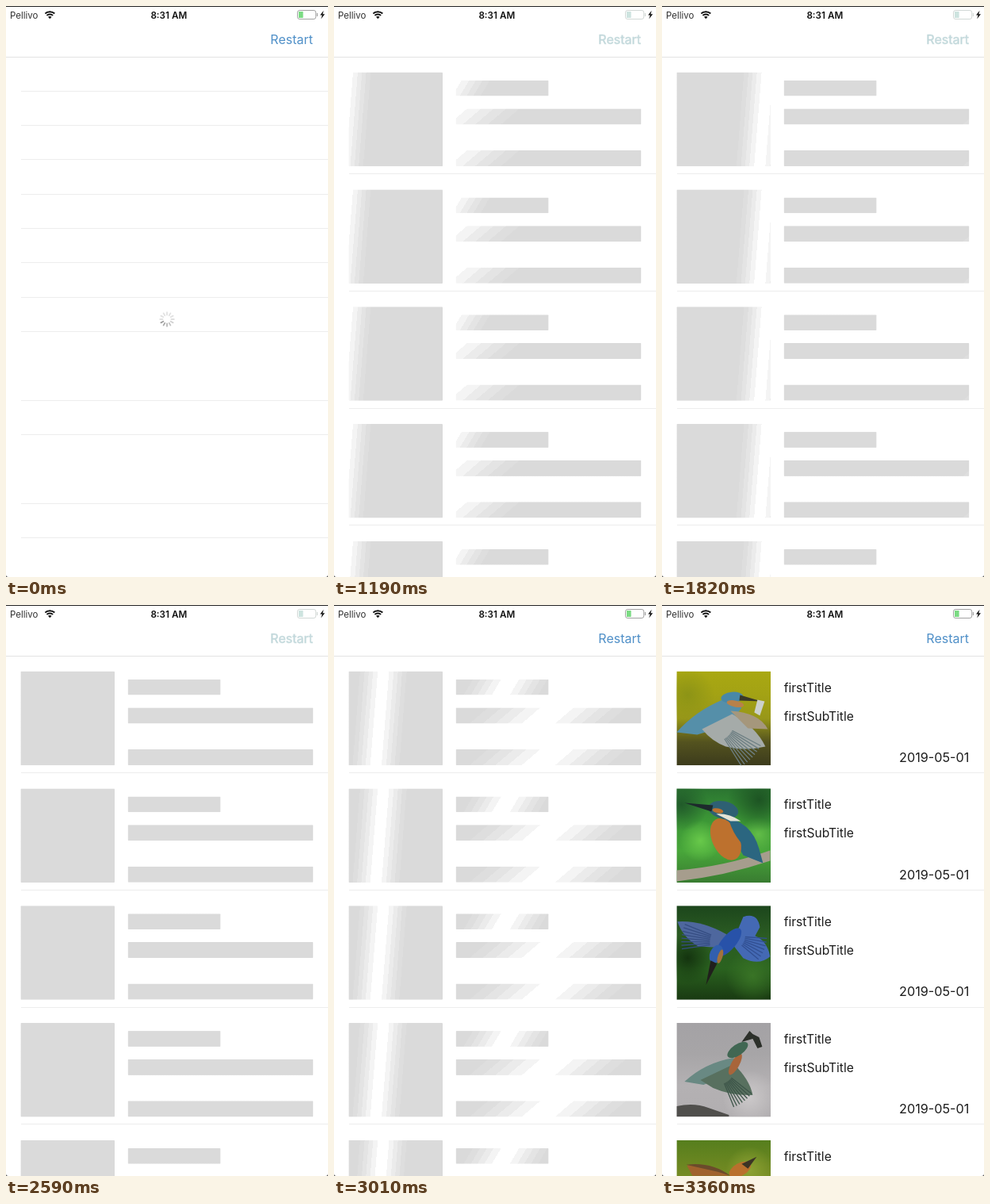
These frames come from a looping animation (406 by 720 pixels, 3.43 s). An HTML page with a canvas:

```html
<!DOCTYPE html>
<html lang="en">
<head>
<meta charset="utf-8">
<title>Skeleton list</title>
<style>
  html, body { margin: 0; width: 100%; height: 100%; overflow: hidden; background: #fff; }
  canvas { display: block; width: 406px; height: 720px; }
</style>
</head>
<body>
<canvas id="stage"></canvas>
<script>
const W = 406, H = 720, LOOP = 3430, TICK = 70;
const SKELETON_AT = 560, CONTENT_AT = 3360;
const SWEEP_AT = 980, SWEEP_PERIOD = 1573, SWEEP_SPEED = 0.00155;
const ROW = 147.8, LEFT = 18.4, TOP = 83.6, BOX = 118.6, GREY = '#dadada';
const FONT = 'Inter, Roboto, sans-serif';

const canvas = document.getElementById('stage');
const ctx = canvas.getContext('2d');
const dpr = window.devicePixelRatio || 1;
canvas.width = W * dpr;
canvas.height = H * dpr;

const clamp = v => Math.max(0, Math.min(1, v));

function rect(x, y, w, h, color) {
  ctx.fillStyle = color;
  ctx.fillRect(x, y, w, h);
}

function text(str, x, y, size, color, align = 'left', weight = 400) {
  ctx.font = `${weight} ${size}px ${FONT}`;
  ctx.textAlign = align;
  ctx.fillStyle = color;
  ctx.fillText(str, x, y);
}

function shape(color, path) {
  ctx.fillStyle = color;
  ctx.fill(new Path2D(path));
}

function oval(color, x, y, rx, ry, turn = 0) {
  ctx.fillStyle = color;
  ctx.beginPath();
  ctx.ellipse(x, y, rx, ry, turn, 0, Math.PI * 2);
  ctx.fill();
}

function backdrop(...colors) {
  const g = ctx.createLinearGradient(0, 0, 0, BOX);
  colors.forEach((c, i) => g.addColorStop(i / (colors.length - 1), c));
  rect(0, 0, BOX, BOX, g);
}

// Soft round patch of light or shade
function glow(color, x, y, r) {
  const g = ctx.createRadialGradient(x, y, 0, x, y, r);
  g.addColorStop(0, color);
  g.addColorStop(1, color + '00');
  oval(g, x, y, r, r);
}

// Feathers spread from a joint between two angles in degrees
function fan(color, x, y, r, from, to, count) {
  ctx.strokeStyle = color;
  ctx.lineWidth = 1.3;
  for (let i = 0; i < count; i++) {
    const a = (from + (to - from) * i / (count - 1)) * Math.PI / 180;
    ctx.beginPath();
    ctx.moveTo(x + r * 0.4 * Math.cos(a), y + r * 0.4 * Math.sin(a));
    ctx.lineTo(x + r * Math.cos(a), y + r * Math.sin(a));
    ctx.stroke();
  }
}

// Soft flat scenes, each in a 118 px square
const photos = [
  () => {
    backdrop('#a9a812', '#a3a214', '#989719', '#54531f', '#3c3b1c');
    glow('#8d9416', 14, 30, 34);
    shape('#558fa9', 'M0 77Q24 50 58 36L82 46 66 68 26 80Z');
    shape('#a5aba9', 'M32 73L70 54Q100 70 112 95Q86 101 62 95Q44 88 32 73Z');
    shape('#a5977c', 'M68 50Q104 52 115 73L90 72Z');
    fan('#6d7f83', 46, 62, 68, 28, 58, 9);
    oval('#4888a8', 70, 33, 14, 7, -0.1);
    oval('#b8814a', 74, 41, 11, 4, 0.2);
    shape('#3b3a28', 'M80 30L107 38 79 37Z');
    shape('#cbd0cc', 'M102 36L111 38 105 56 98 52Z');
  },
  () => {
    backdrop('#2b7531', '#3c9736', '#48a63a', '#397c31');
    glow('#68c94a', 30, 66, 26);
    glow('#62bd48', 103, 58, 22);
    glow('#1d5423', 104, 14, 40);
    glow('#215b2a', 6, 20, 34);
    shape('#a69d8d', 'M0 103Q58 99 118 78V91Q62 110 0 117Z');
    shape('#2b6680', 'M57 36Q94 40 104 76L109 94 84 84Z');
    oval('#bd712e', 62, 64, 17, 28, -0.45);
    shape('#2b6680', 'M66 40Q94 44 106 88Q76 72 66 40Z');
    oval('#2e6073', 59, 27, 19, 11, 0.2);
    shape('#1d2a2c', 'M10 18L46 21 44 29Z');
    shape('#e5e3d5', 'M50 32Q66 31 81 41L68 41Z');
    oval('#bb722f', 52, 28, 7, 3, 0.2);
  },
  () => {
    backdrop('#1c461c', '#2c5d23', '#2a621f', '#193a12');
    glow('#397426', 96, 88, 34);
    glow('#14340f', 14, 66, 32);
    shape('#4e679e', 'M1 20Q31 18 63 36L56 53 27 51Q8 40 1 20Z');
    shape('#4469b4', 'M70 48L84 14Q102 8 105 27L99 38Q114 44 118 64Q104 76 84 66Z');
    fan('#354d82', 66, 46, 60, 172, 202, 8);
    fan('#314f91', 68, 38, 46, 4, 40, 7);
    oval('#2852a9', 66, 46, 9, 22, 0.7);
    oval('#315fae', 50, 61, 8, 12, 0.4);
    oval('#a2723c', 55, 64, 3, 9, 0.3);
    shape('#201f1c', 'M43 69L51 73 37 100Z');
  },
  () => {
    backdrop('#a4a2a5', '#a7a5a7', '#b4b1b3', '#b1aeb0');
    glow('#cbc8c9', 92, 94, 34);
    shape('#504f4c', 'M0 105Q22 100 40 107L66 116V118H0Z');
    shape('#698983', 'M10 74Q36 50 72 44L78 60 34 78Z');
    shape('#58705f', 'M30 72L72 52Q92 71 96 91Q69 92 46 82Z');
    fan('#3d5549', 52, 56, 54, 38, 68, 8);
    oval('#a8653b', 74, 52, 5, 15, 0.5);
    oval('#416753', 77, 34, 15, 7, -0.6);
    shape('#2c302a', 'M82 24L92 10 96 14 104 18 108 30 102 32 96 20Z');
  },
  () => {
    backdrop('#567e1d', '#7f8f25', '#66801d');
    glow('#8ca133', 92, 38, 30);
    shape('#a0622d', 'M13 32Q42 27 66 45H20Z');
    shape('#6b4b2b', 'M12 31Q44 27 68 45L52 40Z');
    oval('#b9702d', 80, 37, 15, 8, -0.5);
    shape('#3b3425', 'M82 30L101 21 90 36Z');
  }
];

// Skewed highlight band; zoom is the size of its gradient relative to the block
function block(x, y, w, h, centre, zoom, skew) {
  ctx.save();
  ctx.beginPath();
  ctx.roundRect(x, y, w, h, 1);
  ctx.clip();
  ctx.translate(x, y);
  ctx.scale(w, h);
  const half = 0.25 * zoom, mid = centre * zoom + skew / 2;
  const at = u => [u / (1 + skew * skew), u * skew / (1 + skew * skew)];
  const g = ctx.createLinearGradient(...at(mid - half), ...at(mid + half));
  const tones = [GREY, '#dedede', '#e4e4e4', '#ebebeb', '#f4f4f4', '#fff'];
  const edges = [0, 0.01, 0.2, 0.38, 0.56, 0.76, 1];
  tones.forEach((c, i) => {
    g.addColorStop(edges[i] / 2, c);
    g.addColorStop(edges[i + 1] / 2, c);
  });
  tones.slice().reverse().forEach((c, i) => {
    g.addColorStop(1 - edges[6 - i] / 2, c);
    g.addColorStop(1 - edges[5 - i] / 2, c);
  });
  rect(0, 0, 1, 1, g);
  ctx.restore();
}

function separators() {
  for (let k = 1; k < 15; k++) {
    if (k !== 9 && k !== 12) rect(19, Math.floor(64 + k * 43.33), W - 19, 1, '#ededed');
  }
}

function spinner(step) {
  ctx.lineWidth = 1.8;
  ctx.lineCap = 'round';
  for (let i = 0; i < 12; i++) {
    const age = (8 + step - i + 24) % 12;
    const a = i * Math.PI / 6;
    const tone = Math.round(Math.min(226, 158 + age * 13));
    ctx.strokeStyle = `rgb(${tone},${tone},${tone})`;
    ctx.beginPath();
    ctx.moveTo(203 + 5.4 * Math.sin(a), 395 - 5.4 * Math.cos(a));
    ctx.lineTo(203 + 8.8 * Math.sin(a), 395 - 8.8 * Math.cos(a));
    ctx.stroke();
  }
  ctx.lineCap = 'butt';
}

function eachRow(draw) {
  for (let i = 0; i < 5; i++) {
    const y = TOP + i * ROW;
    rect(19, Math.floor(y + 127.8), W - 19, 1, '#ededed');
    draw(y, i);
  }
}

function skeleton(centre) {
  eachRow(y => {
    block(LEFT, y, BOX, BOX, centre, 1, 0.08);
    block(153.6, y + 10.1, 117, 19.8, centre, 1.62, 0.1);
    block(153.6, y + 45.8, 233.8, 20.1, centre, 1.5, 0.1);
    block(153.6, y + 98.3, 233.8, 20.1, centre, 1.5, 0.1);
  });
}

function content() {
  eachRow((y, i) => {
    ctx.save();
    ctx.translate(LEFT, y);
    ctx.beginPath();
    ctx.rect(0, 0, BOX, BOX);
    ctx.clip();
    photos[i]();
    ctx.restore();
    text('firstTitle', 153.7, y + 25.9, 15.6, '#1c1c1c');
    text('firstSubTitle', 153.7, y + 61.9, 15.6, '#1c1c1c');
    text('2019-05-01', 387.3, y + 114.2, 16.2, '#1c1c1c', 'right');
  });
}

function wifi() {
  ctx.save();
  ctx.beginPath();
  ctx.moveTo(55.3, 16.2);
  ctx.arc(55.3, 16.2, 10.4, -Math.PI * 0.73, -Math.PI * 0.27);
  ctx.clip();
  ctx.strokeStyle = '#111';
  for (const r of [9, 5.8, 1.6]) {
    ctx.lineWidth = r < 2 ? 3.2 : 2;
    ctx.beginPath();
    ctx.arc(55.3, 16.2, r, 0, Math.PI * 2);
    ctx.stroke();
  }
  ctx.restore();
}

function battery(pale) {
  ctx.strokeStyle = pale ? '#d2d8d6' : '#a2a2a2';
  ctx.lineWidth = 1;
  ctx.beginPath();
  ctx.roundRect(367.5, 5.5, 23.2, 11, 2.6);
  ctx.stroke();
  rect(369, 7, 5.6, 8, pale ? '#cde3df' : '#7bdb83');
  rect(391.8, 9, 1.2, 4, pale ? '#d2d8d6' : '#a2a2a2');
  shape('#111', 'M400.6 5.8L396 11.6H398.6L397.2 16.2 402 10.2H399.3Z');
}

function chrome(pale) {
  rect(0, 0, W, 1, '#222');
  text('Pellivo', 5, 15.5, 11.5, '#333');
  wifi();
  text('8:31 AM', 205.3, 15.5, 11.7, '#111', 'center', 600);
  battery(pale);
  text('Restart', 387, 48, 16, pale ? '#bcd5da' : '#5090c8', 'right');
  if (pale) {
    ctx.strokeStyle = '#cfe0e1';
    ctx.lineWidth = 0.7;
    ctx.strokeText('Restart', 387, 48);
  }
  rect(0, 64, W, 1, '#e2e2e2');
  shape('#444', 'M0 717V720H3Q0 720 0 717ZM406 717V720H403Q406 720 406 717Z');
}

function draw(t) {
  ctx.setTransform(dpr, 0, 0, dpr, 0, 0);
  rect(0, 0, W, H, '#fff');
  const sweep = t < SWEEP_AT ? 0 : (t - SWEEP_AT) % SWEEP_PERIOD;
  const centre = sweep * SWEEP_SPEED - 0.378;
  const loading = t >= SKELETON_AT && t < CONTENT_AT;

  if (t >= CONTENT_AT) {
    content();
  } else {
    const shown = clamp((t - SKELETON_AT + TICK) / 280);
    if (shown < 1) {
      ctx.globalAlpha = 1 - shown;
      separators();
      spinner(Math.min(6, t / TICK));
    }
    if (loading) {
      ctx.globalAlpha = shown;
      skeleton(centre);
    }
    ctx.globalAlpha = 1;
  }
  chrome(loading && (centre < 0.1 || centre > 0.75));
}

function frame() {
  const t = performance.now() % LOOP;
  draw(Math.floor(t / TICK) * TICK);
  requestAnimationFrame(frame);
}
frame();
</script>
</body>
</html>
```
